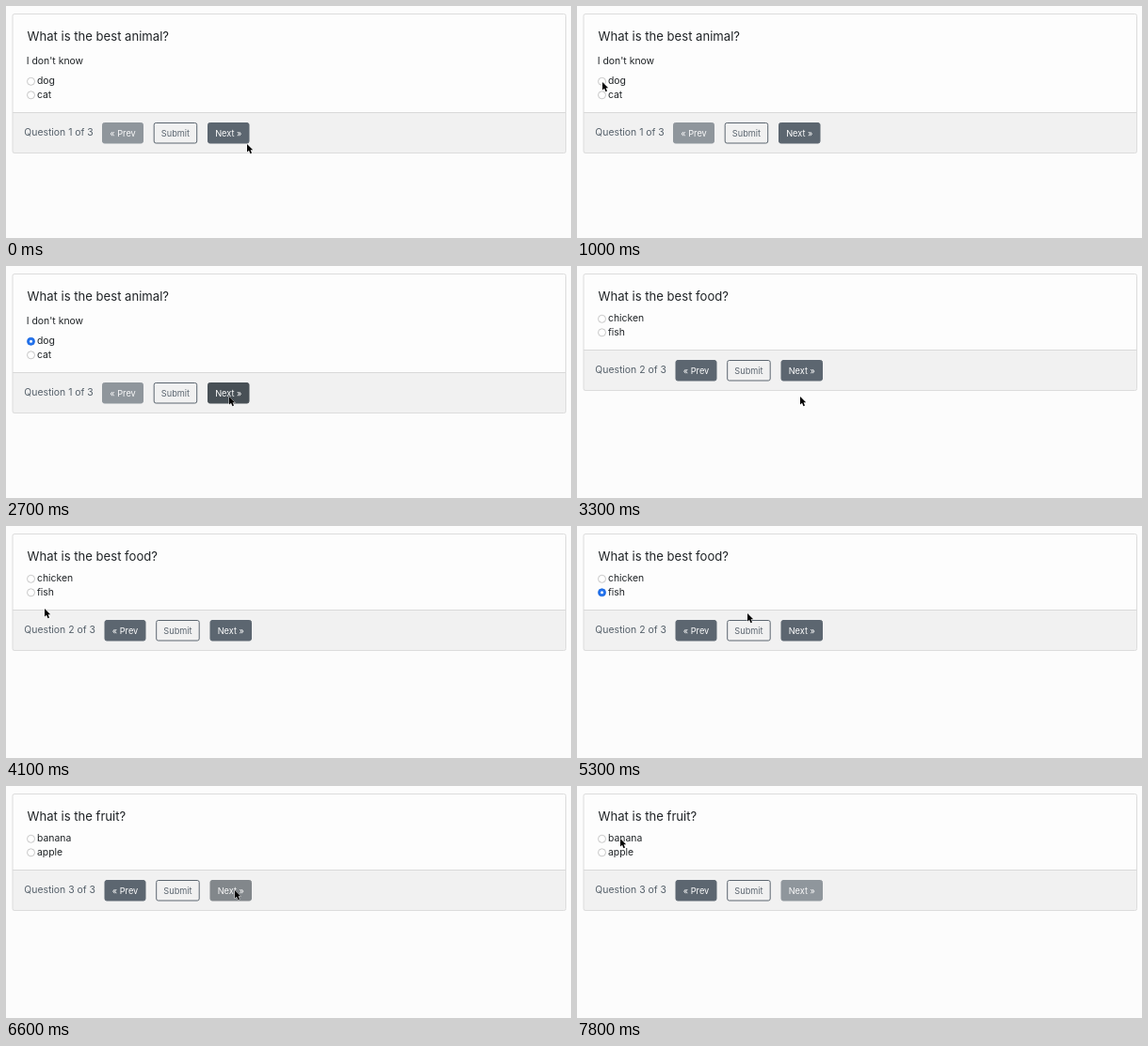
Write an HTML page that moves like this. It is 600x247 px and loops after 8000 ms.

```html
<!DOCTYPE html>
<html lang="en">
<head>
<meta charset="utf-8">
<title>Quiz</title>
<style>
  html, body { margin: 0; width: 100%; height: 100%; overflow: hidden; background: #fcfcfc; }
  svg { display: block; width: 600px; height: 247px; }
  text { font: 10.4px Inter, "Open Sans", sans-serif; fill: #1f2326; white-space: pre; }
  .title { font-size: 13.1px; }
  .count { fill: #55606a; }
  .label { font-size: 9.2px; text-anchor: middle; }
</style>
</head>
<body>
<svg id="stage" viewBox="0 0 600 247"></svg>
<script>
const LOOP = 8000, STEP = 100;
const SLATE = '#5c6670', DARK = '#485056';

const pages = [
  { from: 0, title: 'What is the best animal?', note: "I don't know", options: ['dog', 'cat'],
    pick: 0, press: 1400, check: 1500 },
  { from: 3300, title: 'What is the best food?', options: ['chicken', 'fish'],
    pick: 1, press: 4700, check: 4900 },
  { from: 6300, title: 'What is the fruit?', options: ['banana', 'apple'] }
];

// Pointer stops: time, x, y, and 1 where it arrives at constant speed
const path = [
  [0, 256, 147], [900, 29, 81], [1000, 27, 81],
  [1800, 27, 81], [2700, 237, 139],
  [3700, 237, 139], [4100, 41, 88], [4500, 34, 75],
  [5000, 34, 75], [5300, 181, 93, 1], [5600, 258, 113, 1], [5900, 246, 114],
  [6300, 246, 114], [6600, 243, 111], [7100, 60, 68], [7300, 46, 56.5],
  [7700, 46, 56.5], [7800, 46, 56], [LOOP, 46, 56]
];

function pointerAt(t) {
  const i = path.findIndex(p => p[0] > t);
  const [t0, x0, y0] = path[i - 1], [t1, x1, y1, steady] = path[i];
  const u = (t - t0) / (t1 - t0), k = steady ? u : u * u * (3 - 2 * u);
  return [x0 + (x1 - x0) * k, y0 + (y1 - y0) * k];
}

const text = (x, y, s, cls = '') => `<text x="${x}" y="${y}" class="${cls}">${s}</text>`;

function radio(y, state) {
  const on = state === 'on';
  const fill = on ? '#2373ee' : state === 'down' ? '#dcdcdc' : '#fff';
  return `<circle cx="26.5" cy="${y}" r="4" fill="${fill}" stroke="${on ? '#1b66dc' : '#b9b9b9'}" stroke-width=".8"/>` +
    (on ? `<circle cx="26.5" cy="${y}" r="1.5" fill="#fff"/>` : '');
}

function button(x, y, w, s, { color = SLATE, outline, disabled }) {
  return `<g opacity="${disabled ? .65 : 1}">
    <rect x="${x + .5}" y="${y + .5}" width="${w - 1}" height="21.5" rx="2" fill="${outline ? 'none' : color}" stroke="${color}"/>
    <text x="${x + w / 2}" y="${y + 14.6}" class="label" style="fill:${outline ? color : '#fff'}">${s}</text></g>`;
}

function pointer(x, y) {
  return `<path transform="translate(${x} ${y})" d="M0 0V8.6L2 6.8L3.5 10.2L5 9.5L3.6 6.3H6.2Z"
    fill="#000" stroke="#fff" stroke-width=".8" paint-order="stroke"/>`;
}

function draw(t) {
  const n = pages.findLastIndex(p => t >= p.from), page = pages[n];
  const drop = page.note ? 0 : -24;
  const foot = 113.5 + drop, top = 124 + drop, left = n ? 104.5 : 102;
  const [x, y] = pointerAt(t);
  const nextX = left + 112;
  const hover = x >= nextX && x < nextX + 44.5 && y >= top && y < top + 22;

  const options = page.options.map((s, i) => {
    const mid = 80.3 + drop + i * 14.5;
    const state = i !== page.pick ? '' : t >= page.check ? 'on' : t >= page.press ? 'down' : '';
    return radio(mid, state) + text(33, mid + 2.8, s);
  }).join('');

  stage.innerHTML = `
    <rect x="7" y="8.5" width="587.5" height="${foot + 34.5}" rx="2" fill="#fdfdfd"/>
    <path d="M7 ${foot}H594.5V${foot + 43}H7Z" fill="#f1f1f1"/>
    <path d="M7 ${foot}H594.5" stroke="#d9d9d9"/>
    <rect x="7" y="8.5" width="587.5" height="${foot + 34.5}" rx="2" fill="none" stroke="#dcdcdc"/>` +
    text(22.5, 37, page.title, 'title') +
    (page.note ? text(21.8, 61.5, page.note) : '') +
    options +
    text(19.3, top + 13.8, `Question ${n + 1} of 3`, 'count') +
    button(left, top, 44, '« Prev', { disabled: n === 0 }) +
    button(left + 54.7, top, 46.5, 'Submit', { outline: true }) +
    button(nextX, top, 44.5, 'Next »', { color: hover ? DARK : SLATE, disabled: n === 2 }) +
    pointer(x, y);
}

const stage = document.getElementById('stage');
let last = -1;
function tick(now) {
  const t = Math.floor(now % LOOP / STEP) * STEP;
  if (t !== last) draw(last = t);
  requestAnimationFrame(tick);
}
draw(0);
requestAnimationFrame(tick);
</script>
</body>
</html>
```
